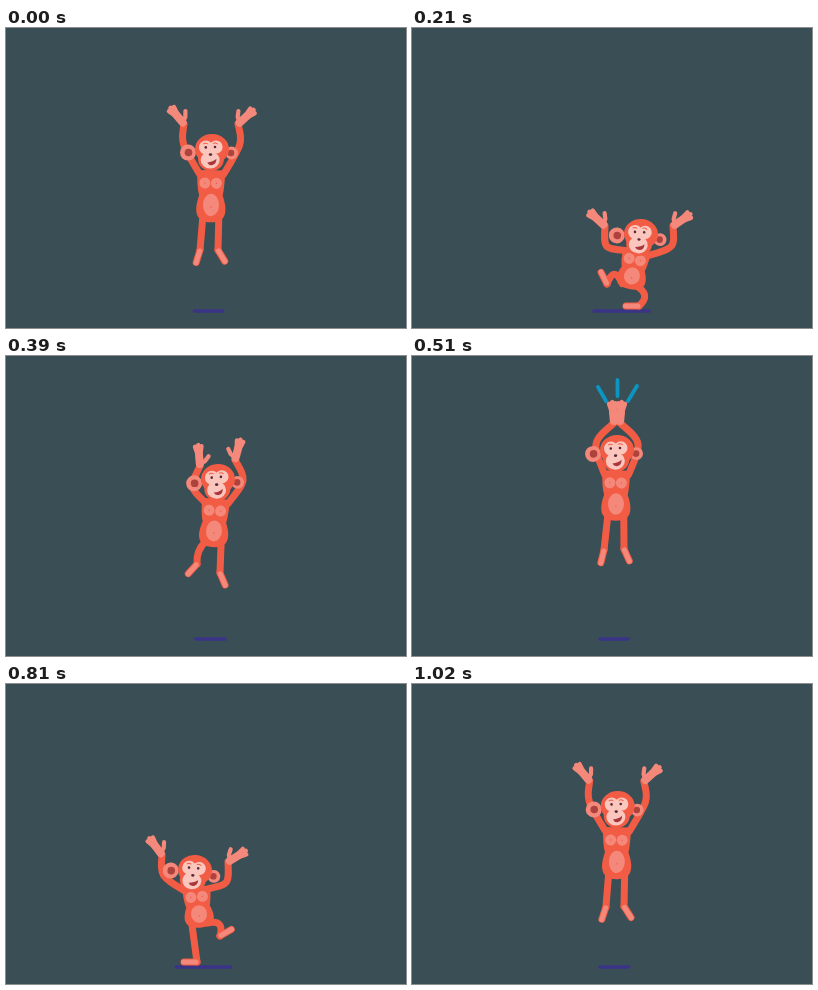
Animation of 400 by 300 pixels, one loop 1.05 s. Source, as an HTML page:

```html
<!DOCTYPE html>
<html lang="en">
<head>
<meta charset="utf-8">
<title>Jumping monkey</title>
<style>
html, body { margin: 0; width: 100%; height: 100%; overflow: hidden; background: #394f55; }
svg { display: block; width: 100%; height: 100%; }
path, line { stroke-linecap: round; stroke-linejoin: round; }
.fur { fill: #f25c45; }
.limb { fill: none; stroke: #f25c45; stroke-width: 7; }
.skin { fill: #f4887a; }
.face { fill: #fac6bd; }
.dark { fill: #5a2733; }
.inner { fill: #ae423c; }
.hand path { fill: none; stroke: #f4887a; }
</style>
</head>
<body>
<svg viewBox="0 0 400 300">
  <defs>
    <g id="handShape" class="hand">
      <path d="M0 -2L0 -12" stroke-width="8"/>
      <path d="M-1 -10L-3.3 -19.5M0 -10L0 -21M1 -10L3.2 -19.5" stroke-width="4.4"/>
      <path d="M1 -2.5L5.5 -4.5L9.4 -9" stroke-width="4.2"/>
    </g>
    <g id="footShape">
      <path d="M0 0L13 0" stroke="#f25c45" stroke-width="7"/>
      <path d="M1 0L13.5 0" stroke="#f4887a" stroke-width="5"/>
    </g>
  </defs>
  <line id="shadow" y1="283" y2="283" stroke="#3b3486" stroke-width="3.6"/>
  <g id="burst" stroke="#0d94c1" stroke-width="3.8"></g>
  <path id="arm0" class="limb"/>
  <path id="arm1" class="limb"/>
  <path id="leg0" class="limb"/>
  <path id="leg1" class="limb"/>
  <use id="foot0" href="#footShape"/>
  <use id="foot1" href="#footShape"/>
  <g id="torso">
    <path id="trunk" class="fur"/>
    <g id="chest">
      <circle class="skin" cx="-6.5" r="5.5"/>
      <circle class="skin" cx="5" r="5.5"/>
      <circle class="fur" cx="-6.5" r=".7"/>
      <circle class="fur" cx="5" r=".7"/>
    </g>
    <ellipse id="belly" class="skin" rx="8"/>
    <circle class="fur" cy="2" r=".7"/>
  </g>
  <g id="head">
    <circle class="skin" cx="-24" cy="3.5" r="8"/>
    <circle class="inner" cx="-23.5" cy="3.5" r="3.8"/>
    <circle class="skin" cx="19.5" cy="4" r="6.4"/>
    <circle class="inner" cx="19" cy="4" r="3.3"/>
    <ellipse class="fur" rx="17" ry="15"/>
    <ellipse class="fur" cx="-1" cy="10" rx="13" ry="12"/>
    <circle class="face" cx="-6" cy="-1.5" r="7"/>
    <circle class="face" cx="4" cy="-2" r="6.6"/>
    <ellipse class="face" cx="-1.8" cy="11" rx="9.5" ry="8.6"/>
    <circle class="dark" cx="-6.2" cy="-1.6" r="1.3"/>
    <circle class="dark" cx="3" cy="-2" r="1.3"/>
    <path d="M-8.5 -5.3Q-6.5 -6.5 -4.7 -5.4M1.5 -5.8Q3.5 -6.8 5.5 -5.2" fill="none" stroke="#f25c45"/>
    <ellipse class="dark" cx="-1.5" cy="5.6" rx="1.7" ry="1.3"/>
    <path d="M-4.8 13.4Q1 13 4.4 9.8Q4.6 15.6 -.5 16.2Q-3.6 16 -4.8 13.4Z" fill="#a8373b"/>
  </g>
  <use id="hand0" href="#handShape"/>
  <use id="hand1" href="#handShape"/>
</svg>
<script>
const LOOP = 1050, STEP = 30;
const $ = id => document.getElementById(id);
const set = (id, attrs) => {
  for (const key in attrs) $(id).setAttribute(key, attrs[key]);
};
const place = (x, y, angle) => `translate(${x} ${y}) rotate(${angle})`;

const linear = s => s;
const fall = s => s ** 1.3;
const settle = s => 1 - (1 - s) ** 2;
const smooth = s => s * s * (3 - 2 * s);

// from/to: time span of the move that follows the pose.
// body: head x, y, tilt, belly x, y; arms and legs: x, y, angle (left, right).
const poses = [
  { from: 60, to: 120, ease: fall, body: [206, 121, 0, 205, 177],
    arms: [178, 96, -40, 232, 96, 48], legs: [194, 222, 107, 212, 222, 59] },
  { from: 120, to: 210, ease: settle, body: [217, 171, 3, 212, 221],
    arms: [173, 156, -48, 252, 158, 52], legs: [193, 249, 175, 220, 269, 130] },
  { from: 210, to: 315, ease: smooth, body: [229, 206, 5, 220, 248],
    arms: [193, 198, -48, 261, 198, 56], legs: [195, 256, 243, 227, 278, 180] },
  { from: 315, to: 390, ease: linear, body: [221, 184, -4, 215, 229],
    arms: [191, 172, -30, 251, 169, 36], legs: [196, 252, 205, 222, 278, 175] },
  { from: 390, to: 510, ease: settle, body: [212, 123, -2, 208, 175],
    arms: [194, 110, -5, 229, 104, 15], legs: [191, 208, 132, 214, 217, 67] },
  { from: 555, to: 660, ease: smooth, body: [205, 94, -1, 204, 148],
    arms: [202, 67, -5, 208, 67, 5], legs: [192, 194, 104, 212, 193, 66] },
  { from: 660, to: 810, ease: smooth, body: [176, 203, -8, 188, 248],
    arms: [150, 190, -30, 200, 191, 12], legs: [191, 278, 180, 215, 259, -52] },
  { from: 810, to: 1050, ease: settle, body: [189, 186, 7, 193, 230],
    arms: [156, 171, -37, 222, 178, 58], legs: [191, 278, 180, 214, 252, -30] }
];

const rays = [[194, 45, 186, 31], [205.5, 40, 205.5, 24], [216, 45, 225, 30]];
$('burst').innerHTML = '<line/>'.repeat(rays.length);

function poseAt(t) {
  const i = poses.findIndex(p => t < p.to);
  const a = poses[i], b = poses[(i + 1) % poses.length];
  const s = a.ease(Math.max(0, (t - a.from) / (a.to - a.from)));
  const mix = key => a[key].map((v, k) => v + (b[key][k] - v) * s);
  return { body: mix('body'), arms: mix('arms'), legs: mix('legs') };
}

function drawArm(i, side, shoulder, [x, y, angle], headX) {
  const reach = (x - headX) * side;
  const elbow = [x + side * Math.max(-1, 21 - 0.72 * reach), y + 20.5];
  // Control point that pulls the curve towards the elbow.
  const c = elbow.map((v, k) => v + (v - (shoulder[k] + [x, y][k]) / 2) / 4);
  set('arm' + i, { d: `M${shoulder}C${c} ${c} ${x} ${y}` });
  set('hand' + i, { transform: `${place(x, y, angle)} scale(${-side} 1)` });
}

function drawLeg(i, side, hip, [x, y, angle]) {
  const dx = x - hip[0], dy = y - hip[1];
  const length = Math.hypot(dx, dy);
  // A shortened leg bends outwards, square to the line from hip to ankle.
  const bend = side * 1.6 * Math.max(0, 27 - length) / length;
  const knee = [hip[0] + dx / 2 + dy * bend, hip[1] + dy / 2 - dx * bend];
  set('leg' + i, { d: `M${hip}Q${knee} ${x} ${y}` });
  set('foot' + i, { transform: place(x, y, angle) });
}

function drawBurst(t) {
  const start = t < 540 ? 0 : t < 570 ? 0.3 : 0.65;
  $('burst').style.display = t >= 510 && t < 600 ? '' : 'none';
  rays.forEach(([x1, y1, x2, y2], i) => {
    const ray = $('burst').children[i];
    ray.setAttribute('x1', x1 + (x2 - x1) * start);
    ray.setAttribute('y1', y1 + (y2 - y1) * start);
    ray.setAttribute('x2', x2);
    ray.setAttribute('y2', y2);
  });
}

function draw(t) {
  const { body: [hx, hy, tilt, bx, by], arms, legs } = poseAt(t);
  const d = Math.hypot(hx - bx, hy - by);
  const lean = Math.atan2(hx - bx, by - hy);
  const cos = Math.cos(lean), sin = Math.sin(lean);
  const onTorso = (x, y) => [bx + x * cos - y * sin, by + x * sin + y * cos];
  const p = (x, k) => `${x} ${k * d} `;

  set('head', { transform: place(hx, hy, tilt) });
  set('torso', { transform: place(bx, by, lean * 180 / Math.PI) });
  set('trunk', { d: 'M' + p(-14.5, -.62) +
    'C' + p(-14, -.4) + p(-14, -.3) + p(-12, -.17) +
    'C' + p(-17, .1) + p(-16, .31) + p(0, .31) +
    'C' + p(16, .31) + p(17, .1) + p(11.5, -.17) +
    'C' + p(13, -.3) + p(13, -.4) + p(14, -.62) + 'Z' });
  set('chest', { transform: `translate(0 ${-0.39 * d})` });
  set('belly', { ry: 0.2 * d });

  [-1, 1].forEach((side, i) => {
    drawArm(i, side, onTorso(side * 12, -0.55 * d), arms.slice(i * 3, i * 3 + 3), hx);
    drawLeg(i, side, onTorso(side * 8, 0.22 * d), legs.slice(i * 3, i * 3 + 3));
  });

  const mid = 202.5 + (hx - 206) * 0.3;
  const half = Math.min(27.5, Math.max(14.2, 14.2 + (hy - 121) * 0.2));
  set('shadow', { x1: mid - half, x2: mid + half });
  drawBurst(t);
}

const begin = performance.now();
function tick() {
  const t = (performance.now() - begin) % LOOP;
  draw(Math.floor(t / STEP) * STEP);
  requestAnimationFrame(tick);
}
tick();
</script>
</body>
</html>
```
